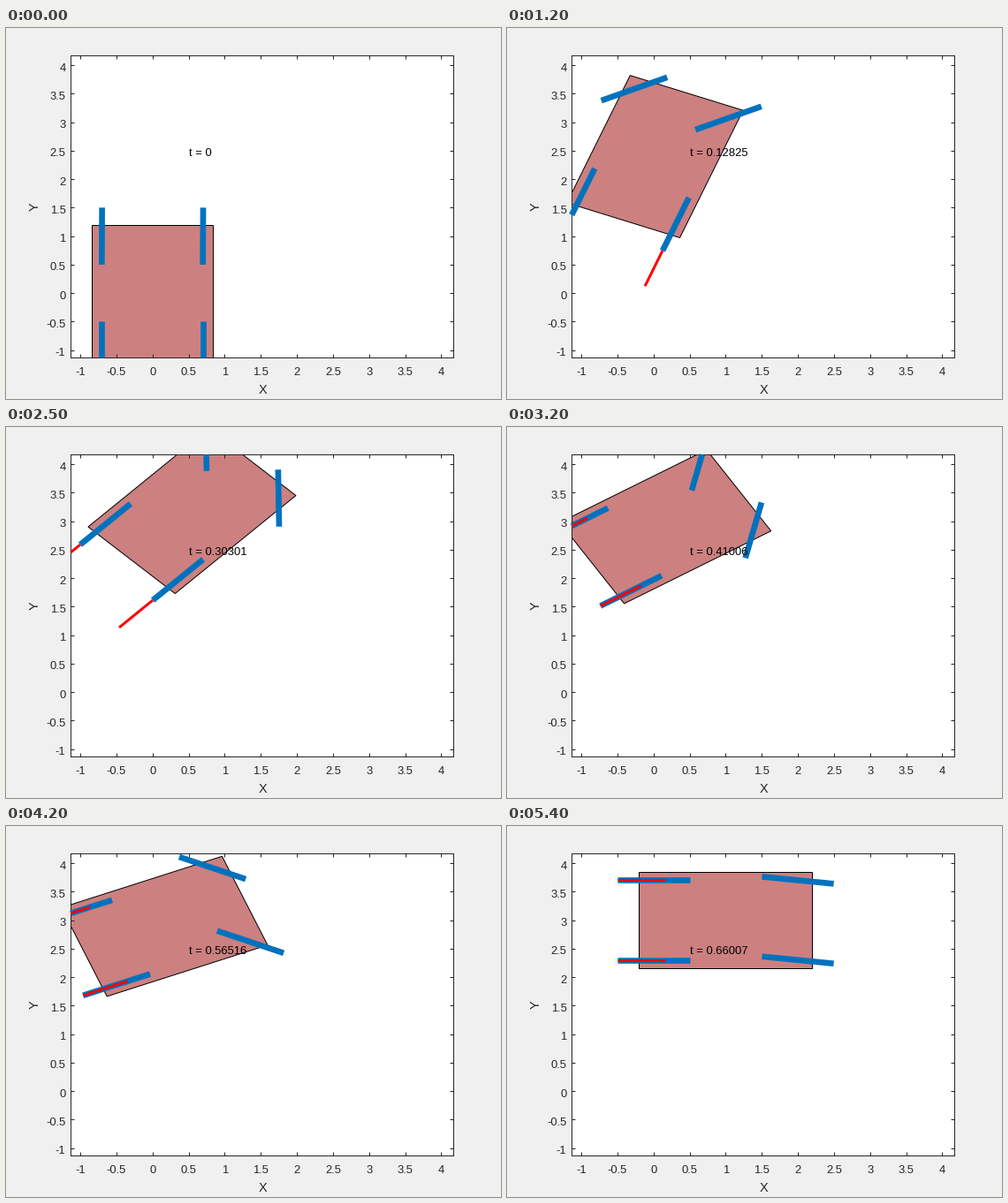
Recreate the animation shown at these times as a matplotlib script. Size 560 px wide and 420 px high, loop 5500 ms.

```python
import numpy as np
import matplotlib.pyplot as plt
from matplotlib.animation import FuncAnimation

W, H, DPI = 560, 420, 100
PX = 72 / DPI                      # one pixel in points
LEFT, TOP, SIDE_X, SIDE_Y = 73.2, 31.2, 433, 342
BOTTOM = TOP + SIDE_Y
LO, HI = -1.132, 4.168             # same limits on both axes
INK, BLUE, RED, PINK = "#262626", "#0072bd", "#ff0000", "#cc8080"

T_END, T_SWITCH = 0.660073, 0.3907
ACCEL, V0, WHEELBASE = 100, 29.0, 2.0
LENGTH, WIDTH, TRACK = 2.4, 1.68, 1.4

plt.rcParams["font.family"] = "Liberation Sans"


# ---- time mesh: ten equal intervals, each with its own Radau points ----
def radau(n):
    roots = np.polynomial.legendre.legroots([0] * (n - 1) + [1, 1])
    return (np.sort(roots.real) + 1) / 2


ORDERS = [8] + [5] * 3 + [4] * 4 + [6, 9]
mesh = np.concatenate([(k + radau(n)) / 10 for k, n in enumerate(ORDERS)] + [[1]])
times = np.abs(np.round(mesh * T_END, 9))


# ---- car model: bang-bang acceleration, steering between full locks ----
def ramp(t, start, duration):
    return np.clip((t - start) / duration, 0, 1)


def steering(t):
    """Full right lock, except for an early wiggle and a left-lock spell."""
    wiggle = 73.5 / (1 + ((t - 0.0175) / 0.033) ** 2) ** 2
    left_lock = 90 * (ramp(t, 0.2257, 0.0628) - ramp(t, 0.4505, 0.11))
    straighten = 37.9 * ramp(t, T_END - 0.01, 0.01)
    return np.radians(-45 + wiggle + left_lock + straighten)


def integrate(rate, t):
    steps = (rate[1:] + rate[:-1]) / 2 * np.diff(t)
    return np.concatenate([[0], np.cumsum(steps)])


def simulate():
    t = np.linspace(0, T_END, 6001)
    v = V0 - ACCEL * t + 2 * ACCEL * np.maximum(t - T_SWITCH, 0)
    heading = np.pi / 2 + integrate(v * np.sin(steering(t)) / WHEELBASE, t)
    speed = v * np.cos(steering(t))
    x = integrate(speed * np.cos(heading), t)
    y = integrate(speed * np.sin(heading), t)
    return t, (x, y, heading)


# key poses: share of the total time, x, y, heading in degrees
KEY_POSES = [(0, 0, 0, 90), (0.1, -0.137, 1.53, 91.5),
             (0.459, 0.548, 3.175, 45.8), (1, 1, 3, 0)]


def make_poses():
    """Model path, with its drift from the key poses spread evenly."""
    t, path = simulate()
    share, x, y, degrees = np.array(KEY_POSES).T
    key_t = share * T_END
    columns = []
    for model, goal in zip(path, (x, y, np.radians(degrees))):
        drift = goal - np.interp(key_t, t, model)
        columns.append(np.interp(times, t, model) + np.interp(times, key_t, drift))
    return np.array(columns).T


poses = make_poses()

# ---- stage ----
fig = plt.figure(figsize=(W / DPI, H / DPI), dpi=DPI, facecolor="#f0f0f0")
ax = fig.add_axes([LEFT / W, 1 - BOTTOM / H, SIDE_X / W, SIDE_Y / H])
ax.set(xlim=(LO, HI), ylim=(LO, HI), facecolor="white")
ticks = np.arange(-1, 4.1, 0.5)
ax.set_xticks(ticks, [])
ax.set_yticks(ticks, [])
ax.tick_params(direction="in", top=True, right=True, length=4.3 * PX,
               width=PX, color=INK)
for spine in ax.spines.values():
    spine.set(color=INK, linewidth=PX)


def label(x, y, s, size=13, color=INK, **kw):
    """Text at pixel coordinates measured from the top left."""
    return fig.text(x / W, 1 - y / H, s, fontsize=size * PX, color=color, **kw)


for value in ticks:
    share = (value - LO) / (HI - LO)
    label(LEFT + share * SIDE_X, 393, f"{value:g}", ha="center")
    label(67.5, BOTTOM - share * SIDE_Y + 6.5, f"{value:g}", ha="right")
label(290, 414, "X", 14.5, ha="center")
label(33.2, 202.5, "Y", 14.5, ha="center", va="center", rotation=90)
clock = label(206.8, 145, "t = 0", color="black")

BODY = np.array([(-1, -1), (1, -1), (1, 1), (-1, 1)]) * (LENGTH / 2, WIDTH / 2)
WHEELS = [(along, side * TRACK / 2) for along in (-1, 1) for side in (-1, 1)]

body = plt.Polygon(BODY, facecolor=PINK, edgecolor="black", linewidth=PX,
                   joinstyle="miter", zorder=1.5)
ax.add_patch(body)


def stroke(color, width, z):
    return ax.plot([], [], color=color, linewidth=width * PX, zorder=z,
                   solid_capstyle="butt", clip_on=False)[0]


wheels = [stroke(BLUE, 6.67, 4) for _ in WHEELS]
thrusts = [stroke(RED, 3, 5) for _ in range(2)]


def set_segment(line, p, q):
    """Trim the centre line to the axes box; the width may spill over."""
    d = q - p
    begin, end = 0.0, 1.0
    for start, step in zip(p, d):
        if abs(step) < 1e-9:
            if not LO <= start <= HI:
                end = -1.0
            continue
        a, b = sorted(((LO - start) / step, (HI - start) / step))
        begin, end = max(begin, a), min(end, b)
    if begin < end:
        line.set_data(*np.array([p + begin * d, p + end * d]).T)
    else:
        line.set_data([], [])


def unit(angle):
    return np.array([np.cos(angle), np.sin(angle)])


def draw(i):
    t = times[i]
    x, y, heading = poses[i]
    center, ahead = np.array([x, y]), unit(heading)
    left = unit(heading + np.pi / 2)
    body.set_xy(center + BODY @ np.array([ahead, left]))
    pull = ahead * (-1 if t < T_SWITCH else 1) * ACCEL / 150
    for k, (along, side) in enumerate(WHEELS):
        hub = center + along * ahead + side * left
        front = along > 0
        half = 0.5 * (unit(heading + steering(t)) if front else ahead)
        set_segment(wheels[k], hub - half, hub + half)
        if not front:
            set_segment(thrusts[k], hub - half, hub - half + pull)
    clock.set_text(f"t = {t:.5g}")
    return [body, *wheels, *thrusts, clock]


anim = FuncAnimation(fig, draw, frames=len(times), interval=100,
                     repeat=True, repeat_delay=0, blit=False)
plt.show()
```
